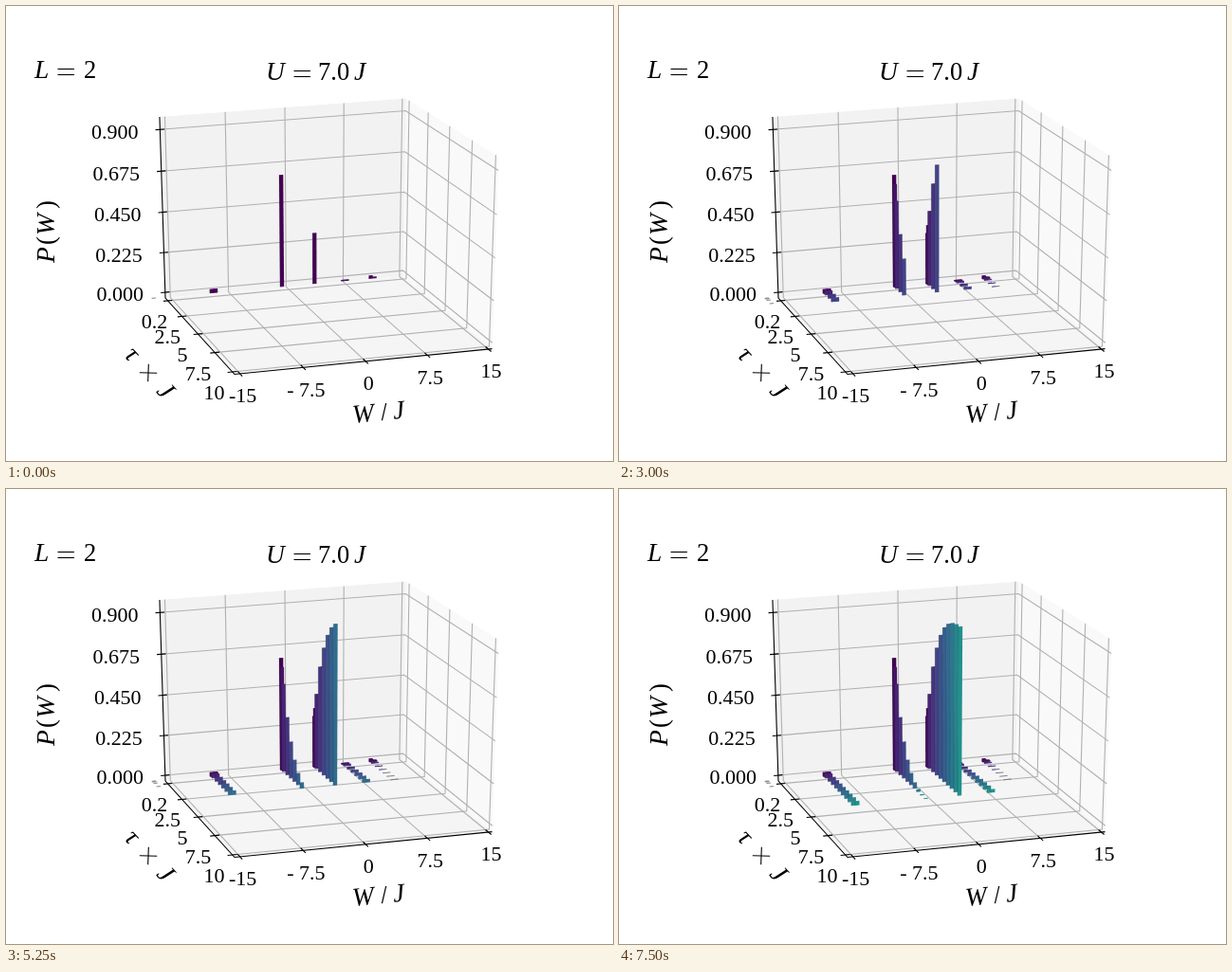
These frames come from a looping animation (640x480 px, 8000 ms). An HTML page with a canvas:

```html
<!DOCTYPE html>
<html lang="en">
<head>
<meta charset="utf-8">
<title>Work distribution</title>
<style>
html, body { margin: 0; width: 100%; height: 100%; overflow: hidden; background: #fff; }
canvas { display: block; width: 640px; height: 480px; }
</style>
</head>
<body>
<canvas id="stage" width="640" height="480"></canvas>
<script>
const ctx = document.getElementById('stage').getContext('2d');
const SERIF = '"Liberation Serif", "Noto Serif", serif';
const LOOP = 8000, STEP = 750;
const GREY = '#77717c';
const PALETTE = ['#440154', '#482475', '#414487', '#355f8d', '#2a788e', '#21918c'];

// Perspective view of the unit box: u to the right, v to the front, z up.
function at(u, v, z) {
  const w = 1 + 0.0223 * u - 0.0853 * v - 0.0355 * z;
  return [
    (168 + 259.8 * u + 52.4 * v - 11.8 * z) / w,
    (308 - 16.6 * u + 47.4 * v - 195.2 * z) / w
  ];
}

// Axis values to box coordinates.
const workU = work => 0.503 + work / 31.1;
const timeV = tau => 0.0205 + 0.095 * tau;
const probZ = p => 0.0325 + p;

function poly(points, fill) {
  ctx.beginPath();
  points.forEach(([x, y]) => ctx.lineTo(x, y));
  ctx.closePath();
  ctx.fillStyle = fill;
  ctx.fill();
}

function line(points, color = '#000', width = 1.1) {
  ctx.beginPath();
  points.forEach(([x, y]) => ctx.lineTo(x, y));
  ctx.strokeStyle = color;
  ctx.lineWidth = width;
  ctx.stroke();
}

function text(str, x, y, size = 22, style = '', align = 'center') {
  ctx.font = `${style} ${size}px ${SERIF}`;
  ctx.textAlign = align;
  ctx.fillStyle = '#000';
  ctx.fillText(str, x, y);
}

const math = (str, x, y) => text(str, x, y, 27.5, 'italic', 'left');
const roman = (str, x, y) => text(str, x, y, 26.5, '', 'left');

function equals(x, y) {
  for (const dy of [9.5, 3.5]) line([[x, y - dy], [x + 17.5, y - dy]]);
}

function turned(x, y, degrees, paint) {
  ctx.save();
  ctx.translate(x, y);
  ctx.rotate(degrees * Math.PI / 180);
  paint();
  ctx.restore();
}

// One axis value: grid line over two panes, tick mark and label.
function mark(grid, tick, label, dx, dy) {
  line(grid, '#b0b0b0');
  return () => {
    line(tick);
    const x = (tick[0][0] + tick[1][0]) / 2, y = (tick[0][1] + tick[1][1]) / 2;
    text(label, x + dx, y + dy);
  };
}

function drawBox() {
  poly([at(1, 0, 1), at(1, 1, 1), at(1, 1, 0), at(1, 0, 0)], '#f9f9f9');
  poly([at(0, 0, 1), at(1, 0, 1), at(1, 0, 0), at(0, 0, 0)], '#f2f2f2');
  poly([at(0, 0, 0), at(1, 0, 0), at(1, 1, 0), at(0, 1, 0)], '#f5f5f5');

  const marks = [];
  for (let i = 0; i < 5; i++) {
    const work = 7.5 * (i - 2), u = workU(work);
    marks.push(mark([at(u, 0, 1), at(u, 0, 0), at(u, 1, 0)],
      [at(u, 0.97, 0), at(u, 1.03, 0)],
      work === -7.5 ? '- 7.5' : String(work), 3, 30.5));

    const tau = Math.max(2.5 * i, 0.2), v = timeV(tau);
    marks.push(mark([at(0, v, 0), at(1, v, 0), at(1, v, 1)],
      [at(-0.018, v, 0), at(0.018, v, 0)],
      String(tau), -14 - 0.5 * tau, 29));

    const p = 0.225 * i, z = probZ(p);
    marks.push(mark([at(0, 0, z), at(1, 0, z), at(1, 1, z)],
      [at(-0.018, 0, z), at(0.018, 0, z)],
      p.toFixed(3), -47.5, 9.4));
  }
  line([at(0, 0, 1), at(0, 0, 0), at(0, 1, 0), at(1, 1, 0)]);
  marks.forEach(draw => draw());
}

function drawTitles() {
  math('L', 30, 76);
  equals(54.5, 76);
  roman('2', 82, 76);
  math('U', 274, 78);
  equals(303.5, 78);
  roman('7.0', 329, 78);
  math('J', 367, 78);

  turned(51, 272, -90, () => {
    math('P', 1, 0);
    roman('(', 20, 0);
    math('W', 30, 0);
    roman(')', 58, 0);
  });
  turned(366, 440, -5.7, () => {
    math('W', 0, 0);
    roman('/', 30, 0);
    math('J', 43, 0);
  });
  turned(150, 387, 47, () => {
    math('τ', -31, 7);
    line([[-6.5, -6.5], [6.5, 6.5]]);
    line([[-6.5, 6.5], [6.5, -6.5]]);
    math('J', 20, 8);
  });
}

// Bars too low to see are skipped; very low ones show as a grey edge.
function bar(work, tau, p, color) {
  if (p < 1.5e-5) return;
  const left = workU(work - 0.26), right = workU(work + 0.26);
  const v = timeV(tau + 0.25), top = probZ(p), base = probZ(0);
  const a = at(left, v, base), b = at(left, v, top);
  const c = at(right, v, top), d = at(right, v, base);
  poly([a, b, c, d], color);
  line([a, d], p < 0.001 ? GREY : color, 0.9);
  line([a, b], 'rgba(0,0,0,0.2)', 0.8);
}

// The low-work peak decays with the ramp time and feeds the next one.
function drawSlice(k) {
  const tau = Math.max(0.2 + 0.1 * k, (k - 1) / 2);
  const s = tau - 0.2;
  const fall = Math.exp(-0.8 * s - 0.034 * s ** 3);
  const color = k % 2
    ? `color-mix(in srgb, ${PALETTE[(k - 1) / 2]}, ${PALETTE[(k + 1) / 2]})`
    : PALETTE[k / 2];
  const low = 0.625 * fall;
  const put = (work, p) => bar(work, tau, p, color);

  put(-17.6, 8e-5 * fall ** 2);
  put(-10.2, 0.022);
  put(-9.7, 0.022);
  put(-1.13, low);
  put(6.85, 0.022 - 0.016 * fall);
  put(7.35, 0.017 - 0.011 * fall);
  put(3.11, 0.912 - low);
  put(10.5, 0.017 * fall ** 2);
  put(11, 0.008 * fall ** 2);
}

function frame(now) {
  const last = Math.floor((now % LOOP) / STEP);
  ctx.fillStyle = '#fff';
  ctx.fillRect(0, 0, 640, 480);
  drawBox();
  for (let k = 0; k <= last; k++) drawSlice(k);
  drawTitles();
}

const start = performance.now();
function tick() {
  frame(performance.now() - start);
  requestAnimationFrame(tick);
}
tick();
</script>
</body>
</html>
```
